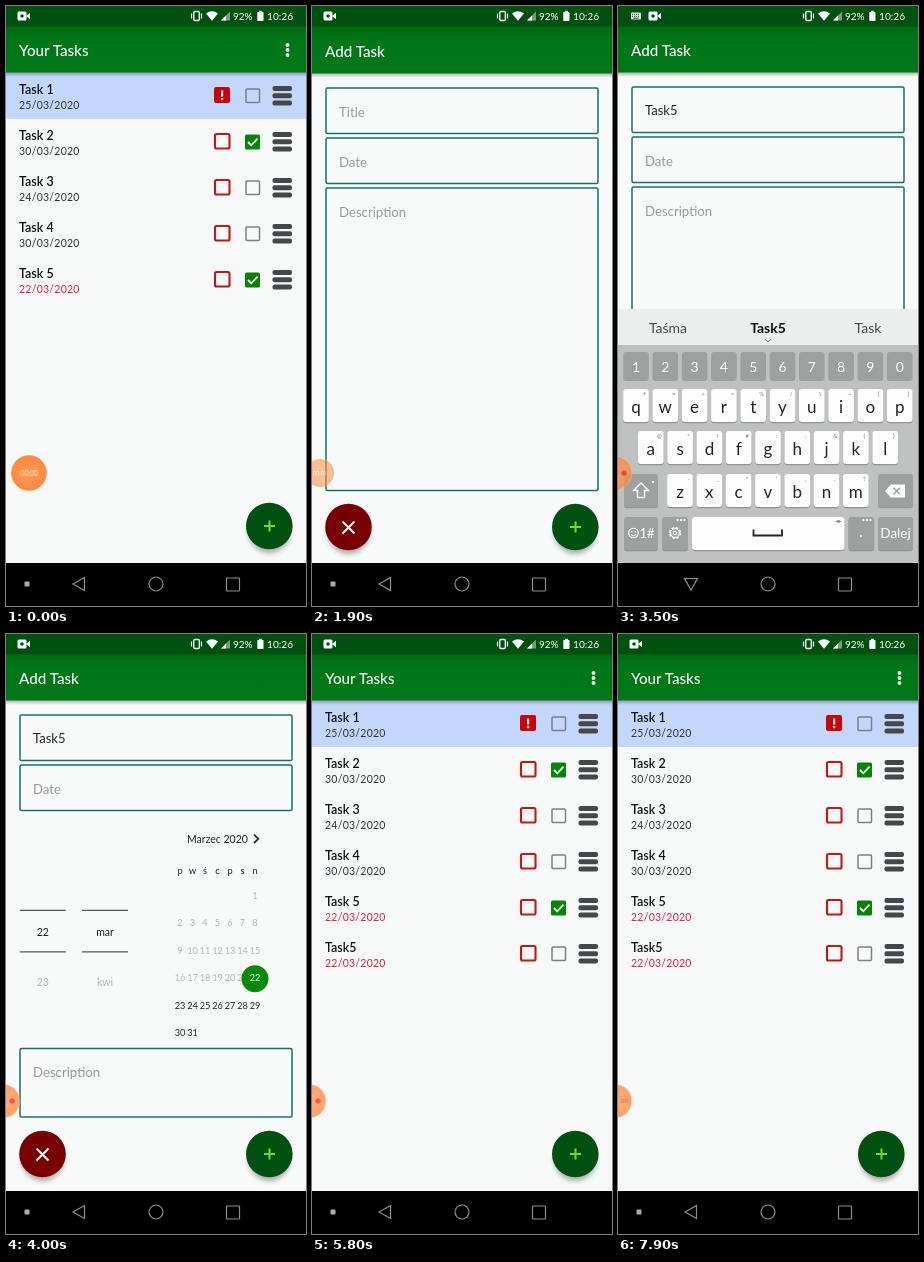
An HTML page for the animation above (8 s loop, 300 by 600 pixels).

```html
<!DOCTYPE html>
<html lang="en">
<head>
<meta charset="utf-8">
<title>Task list</title>
<style>
html, body { margin: 0; width: 100%; height: 100%; overflow: hidden; background: #000; }
svg { display: block; width: 300px; height: 600px; font-family: Lato, "Open Sans", sans-serif; }
.mid { text-anchor: middle; }
.head { font-size: 15.2px; fill: #fff; font-weight: 500; }
.title { font-size: 12.5px; font-weight: 600; fill: #111; }
.date { font-size: 10.5px; letter-spacing: .25px; fill: #333; }
.late { fill: #e0203c; }
.field { fill: #f7faf9; stroke: #16706b; stroke-width: 1.5; }
.hint { font-size: 13.2px; fill: #979b99; }
.input { font-size: 13px; fill: #222; }
.small { font-size: 10.5px; fill: #222; }
.day { font-size: 9.2px; fill: #222; }
.dim { fill: #b4b7b5; }
.key { font-size: 17px; fill: #222; }
.alt { font-size: 6px; fill: #777; }
.light { fill: #fff; }
.word { font-size: 14px; fill: #444; }
.line { fill: none; stroke: #8d8d8d; stroke-width: 1.2; }
#form { animation: form 8s infinite linear; }
#keys { animation: keys 8s infinite ease-out; }
#bubble { animation: bubble 8s infinite linear; }
@keyframes form {
  0%, 21% { opacity: 0; transform: translateY(24px); animation-timing-function: ease-out; }
  23.75% { opacity: 1; transform: translateY(1px); }
  25%, 67.5% { opacity: 1; transform: none; }
  69.5%, 100% { opacity: 0; transform: translateY(14px); }
}
@keyframes keys {
  0%, 25.5% { transform: translateY(256px); }
  28.5%, 45% { transform: none; }
  47.5%, 100% { transform: translateY(256px); }
}
@keyframes bubble {
  0%, 13% { transform: translate(23px, 467px); opacity: 1; }
  17% { transform: translate(23px, 467px); opacity: .6; }
  20%, 37% { transform: translate(8px, 467px) scale(.79); opacity: .58; }
  42%, 100% { transform: translate(-3px, 467px) scale(.94); opacity: .78; }
}
</style>
</head>
<body>
<script>
const LOOP = 8000;
const rules = new Map();

// Shows an element only between two times of the loop.
function during(from, to) {
  const name = `on${from}to${to}`;
  const pct = t => t / LOOP * 100 + '%';
  rules.set(name, `@keyframes ${name} { 0% { opacity: 0 } ${pct(from)} { opacity: 1 } ${pct(to)} { opacity: 0 } }`);
  return `style="animation: ${name} 8s infinite step-end"`;
}
const group = (body, attrs = '') => `<g ${attrs}>${body}</g>`;
const text = (x, y, s, cls, attrs = '') => `<text x="${x}" y="${y}" class="${cls}" ${attrs}>${s}</text>`;
const rect = (x, y, w, h, fill, rx = 0, attrs = '') =>
  `<rect x="${x}" y="${y}" width="${w}" height="${h}" rx="${rx}" fill="${fill}" ${attrs}/>`;
const circle = (x, y, r, fill, attrs = '') => `<circle cx="${x}" cy="${y}" r="${r}" fill="${fill}" ${attrs}/>`;
const path = (d, attrs) => `<path d="${d}" ${attrs}/>`;
const stroke = (color, width) => `fill="none" stroke="${color}" stroke-width="${width}"`;
const range = n => [...Array(n).keys()];

const appBar = title =>
  rect(0, 66, 300, 5, 'url(#shade)') + rect(0, 20, 300, 46.5, 'url(#bar)') + text(13, 50, title, 'head');

const fab = (x, color, icon) =>
  circle(x, 526, 21, '#000', 'opacity=".3" filter="url(#soft)"') + circle(x, 520, 23.3, color) + icon;
const addFab = fab(263.3, '#005010', path('M258 520h11M263.5 514.5v11', stroke('#74d52c', 2)));
const cancelFab = fab(36.5, '#780000', path('M30.5 514.5l12 12m0-12l-12 12', stroke('#fff', 2)));

function row(i, title, date, { late, urgent, done } = {}) {
  const y = 89.5 + i * 46;
  const flag = urgent
    ? rect(208, y - 8.5, 16, 16, '#cb0505', 2) + rect(215, y - 5, 2.2, 6, '#fff') + rect(215, y + 2.5, 2.2, 2.2, '#fff')
    : rect(209, y - 7.5, 14.5, 14.5, 'none', 1.5, 'stroke="#c41616" stroke-width="2.1"');
  const check = done
    ? rect(239, y - 7, 15, 15, '#078307', 1.5) + path(`M242 ${y + .5}l3.3 3.3 6.2-6.6`, stroke('#fff', 1.8))
    : rect(240, y - 6.5, 13.5, 13.5, 'none', 1, 'stroke="#7c8084" stroke-width="1.5"');
  const grip = range(3).map(k => rect(266.5, y - 9.5 + k * 7.2, 19.5, 5, '#45474a', 2)).join('');
  return text(13, y - 2, title, 'title') + text(13, y + 13.5, date, late ? 'date late' : 'date') + flag + check + grip;
}

const list = rect(0, 20, 300, 537, '#f7f9f8') + rect(0, 66, 300, 47, '#c3d7fc') + appBar('Your Tasks') +
  [39, 44, 49].map(y => circle(281.5, y, 1.9, '#fff')).join('') +
  row(0, 'Task 1', '25/03/2020', { urgent: true }) +
  row(1, 'Task 2', '30/03/2020', { done: true }) +
  row(2, 'Task 3', '24/03/2020') +
  row(3, 'Task 4', '30/03/2020') +
  row(4, 'Task 5', '22/03/2020', { late: true, done: true }) +
  group(row(5, 'Task5', '22/03/2020', { late: true }), during(5000, LOOP)) + addFab;

const field = (y, h) => rect(14, y, 272, h, '#f7faf9', 1.5, 'class="field"');

function calendar() {
  const col = i => 174 + i * 12.5;
  const days = range(31).map(i => {
    const n = i + 1, slot = n + 5;
    const x = col(slot % 7), y = 265 + Math.floor(slot / 7) * 27.4;
    const cls = n < 22 ? 'day mid dim' : n === 22 ? 'day mid light' : 'day mid';
    return (n === 22 ? circle(x, y - 2.5, 13.5, '#078a07') : '') + text(x, y, n, cls);
  });
  const wheel = (x, now, next) =>
    path(`M${x - 23} 276.3h46m-46 41.5h46`, stroke('#555', 1.3)) +
    text(x, 302, now, 'small mid') + text(x, 352, next, 'small mid dim');
  return wheel(36.8, 22, 23) + wheel(99, 'mar', 'kwi') +
    text(181, 209, 'Marzec 2020', 'small') + path('M248 200.5l4.3 4.3-4.3 4.3', stroke('#222', 1.7)) +
    [...'pwścpsn'].map((c, i) => text(col(i), 240, c, 'day mid')).join('') + days.join('');
}

function typing() {
  const times = [2400, 2600, 2800, 3000, 3200, 5600];
  const carets = [35, 42.2, 48.5, 55, 62];
  return carets.map((x, i) =>
    text(27, 108.5, 'Task5'.slice(0, i + 1), 'input', during(times[i], times[i + 1])) +
    rect(x - .9, 94, 1.8, 19, '#2d8a12', 0, during(times[i], Math.min(times[i + 1], 3450)))).join('');
}

const form = rect(0, 20, 300, 538, '#f7faf9') + appBar('Add Task') +
  field(81, 45.5) + text(27, 110, 'Title', 'hint', during(0, 2400)) + typing() +
  field(131, 45.5) + text(27, 160, 'Date', 'hint', during(0, 4500)) +
  text(27, 159.5, '22/3/2020', 'input', `font-size="14" letter-spacing=".9" ${during(4500, 5600)}`) +
  group(field(181, 302.5) + text(27, 210, 'Description', 'hint'), during(0, 3900)) +
  group(calendar() + field(414.5, 68.5) + text(27, 443, 'Description', 'hint'), during(3900, 5700)) +
  cancelFab + addFab;

function keyboard() {
  const cap = (x, y, w, fill) => rect(x, y + 1.2, w, 33, '#929594', 3) + rect(x, y, w, 33, fill, 3);
  const keyRow = (chars, alts, x0, y) => [...chars].map((c, i) => {
    const x = x0 + i * 29.3;
    return cap(x - 12.8, y, 25.6, '#fdfdfd') + text(x, y + 24, c, 'key mid') + text(x + 8.5, y + 7, alts[i], 'alt mid');
  }).join('');
  const gray = '#9da09f';
  const numbers = [...'1234567890'].map((c, i) => {
    const x = 18 + i * 29.3;
    return rect(x - 12.8, 346, 25.6, 29, gray, 3) + text(x, 365.5, c, 'mid light', 'font-size="14"');
  }).join('');
  const shift = cap(6, 468, 34, gray) +
    path('M23 477l-7.5 7.5h4v7h7v-7h4z', stroke('#fff', 1.4)) + text(35, 478, '•', 'alt light mid');
  const erase = cap(260, 468, 35, gray) +
    path('M267 485l6-6.5h14v13h-14z', 'fill="#fff"') + path('M275.5 481.8l6.4 6.4m0-6.4l-6.4 6.4', stroke(gray, 1.5));
  const smile = circle(15.5, 527, 4.8, 'none', 'stroke="#fff" stroke-width="1.1"') +
    circle(13.8, 525.7, .8, '#fff') + circle(17.2, 525.7, .8, '#fff') + path('M13 528.5q2.5 3 5 0', stroke('#fff', 1));
  const gear = circle(57, 527, 5.3, 'none', 'stroke="#fff" stroke-width="1.6" stroke-dasharray="2.6 1.56"') +
    circle(57, 527, 4.4, 'none', 'stroke="#fff"') + circle(57, 527, 1.8, 'none', 'stroke="#fff"');
  const bottom = cap(6, 511, 34, gray) + smile + text(29, 532, '1#', 'mid light', 'font-size="13"') +
    cap(44, 511, 26, gray) + gear + text(63, 516, '•••', 'alt light mid') +
    cap(74, 511, 152.5, '#fdfdfd') + path('M163.5 523.5v6h28.500v-6'.replace('163.5', '135.5'), stroke('#222', 1.8)) +
    text(220.5, 517, '◂▸', 'alt mid') +
    cap(230.5, 511, 25.6, gray) + text(243, 531, '.', 'mid light', 'font-size="15"') + text(249, 516, '•••', 'alt light mid') +
    cap(260, 511, 35, gray) + text(277.5, 532, 'Dalej', 'mid light', 'font-size="13.5"');
  const guess = (s, from, to) => group(s, during(from, to));
  const bold = (s, attrs = '') => text(150, 326.5, s, 'word mid', `style="fill:#111;font-weight:700" ${attrs}`);
  const sides = (a, b) => text(50, 326.5, a, 'word mid') + text(250, 326.5, b, 'word mid');
  const words =
    guess(bold('T'), 2400, 2600) +
    guess(text(150, 326.5, 'T<tspan fill="#45a598">a</tspan>', 'mid', 'font-size="15.5" font-weight="600"'), 2600, 2800) +
    guess(bold('Tas'), 2800, 3000) +
    guess(sides('Taśma', 'Taki') + bold('Task'), 3000, 3200) +
    guess(sides('Taśma', 'Task') + bold('Task5') + path('M147 333.300l3 2.500 3-2.500', stroke('#777', 1)), 3200, 4000);
  return rect(0, 303, 300, 36, '#eceeed') + rect(0, 339, 300, 219, '#bec1c0') + words + numbers +
    keyRow('qwertyuiop', '+×÷=%/\\~[]', 18, 383) +
    keyRow('asdfghjkl', '@*!#:;&()', 32.8, 425) +
    keyRow('zxcvbnm', '-_"\',.?', 62, 468) + shift + erase + bottom;
}

const camera = x => rect(x - 5.500, 5.5, 9, 9, '#fff', 1.5) + path(`M${x + 3} 10l4-3.300v6.600z`, 'fill="#fff"') +
  circle(x - 1, 10, 1.8, '#00500f');
const keyIcon = rect(13, 6.5, 10, 7, '#dfeae0', 1) +
  path('M14 8.300h8m-8 2h8', 'stroke="#00500f" stroke-dasharray="1 1"') + path('M15.5 12.200h5', 'stroke="#00500f"');

const status = rect(0, 0, 300, 20.5, '#00510f') +
  group(camera(17), during(0, 2150)) + group(keyIcon + camera(36), during(2150, 3750)) +
  group(camera(17), during(3750, LOOP)) +
  rect(187.8, 5.5, 5.5, 9, 'none', 1, 'stroke="#fff" stroke-width="1.3"') +
  path('M185.500 7.500v5m10-5v5', stroke('#fff', 1.2)) +
  path('M200 7.500q6-4.500 12 0l-6 7.300z', 'fill="#fff"') +
  path('M224 5.500v9h-9z', 'fill="#fff" opacity=".45"') + path('M220 9.500v5h-5z', 'fill="#fff"') +
  text(227, 13.8, '92%', 'light', 'font-size="10"') +
  rect(251.3, 6, 6.2, 9, '#fff', .8) + rect(253, 4.8, 2.8, 1.5, '#fff') +
  text(261, 13.8, '10:26', 'light', 'font-size="10.2"');

const back = path('M78.500 571.500v13l-11.500-6.500z', 'class="line"') + rect(18.5, 575.5, 5, 5, '#aaa', .5);
const nav = rect(0, 557, 300, 43, '#000') +
  group(back, during(0, 2150)) + group(back, during(3750, LOOP)) +
  group(path('M66.500 572.500h13l-6.500 11.500z', 'class="line"'), during(2150, 3750)) +
  circle(150, 578, 7, 'none', 'class="line"') + rect(220.5, 572, 13, 13, 'none', .5, 'class="line"');

const bubble = circle(0, 0, 18.3, '#fff', 'opacity=".5"') + circle(0, 0, 17.8, 'url(#glow)') +
  range(4).map(s => text(0, 2.5, `00:0${s}`, 'mid', `fill="#ffe9d6" font-size="6.8" ${during(s * 1000, Math.min(s * 1000 + 1000, 3350))}`)).join('') +
  circle(9.5, 0, 2.8, '#e8262a', during(3350, 7000)) +
  text(10, 2.5, '00', 'mid', `fill="#b9552c" font-size="6.8" ${during(7000, LOOP)}`);

const defs = `<defs>
  <linearGradient id="bar" x2="0" y2="1"><stop stop-color="#006a12"/><stop offset=".3" stop-color="#007717"/><stop offset="1" stop-color="#007817"/></linearGradient>
  <linearGradient id="shade" x2="0" y2="1"><stop stop-opacity=".3"/><stop offset="1" stop-opacity="0"/></linearGradient>
  <radialGradient id="glow"><stop stop-color="#ff9a55"/><stop offset="1" stop-color="#fb8a3f"/></radialGradient>
  <filter id="soft" x="-30%" y="-30%" width="160%" height="160%"><feGaussianBlur stdDeviation="2.6"/></filter>
</defs>`;

const scene = defs + list + group(form, 'id="form"') + group(keyboard(), 'id="keys"') +
  status + nav + group(bubble, 'id="bubble"');
const sheet = document.createElement('style');
sheet.textContent = [...rules.values()].join('\n');
document.head.append(sheet);
document.body.innerHTML = `<svg viewBox="0 0 300 600">${scene}</svg>`;
</script>
</body>
</html>
```
